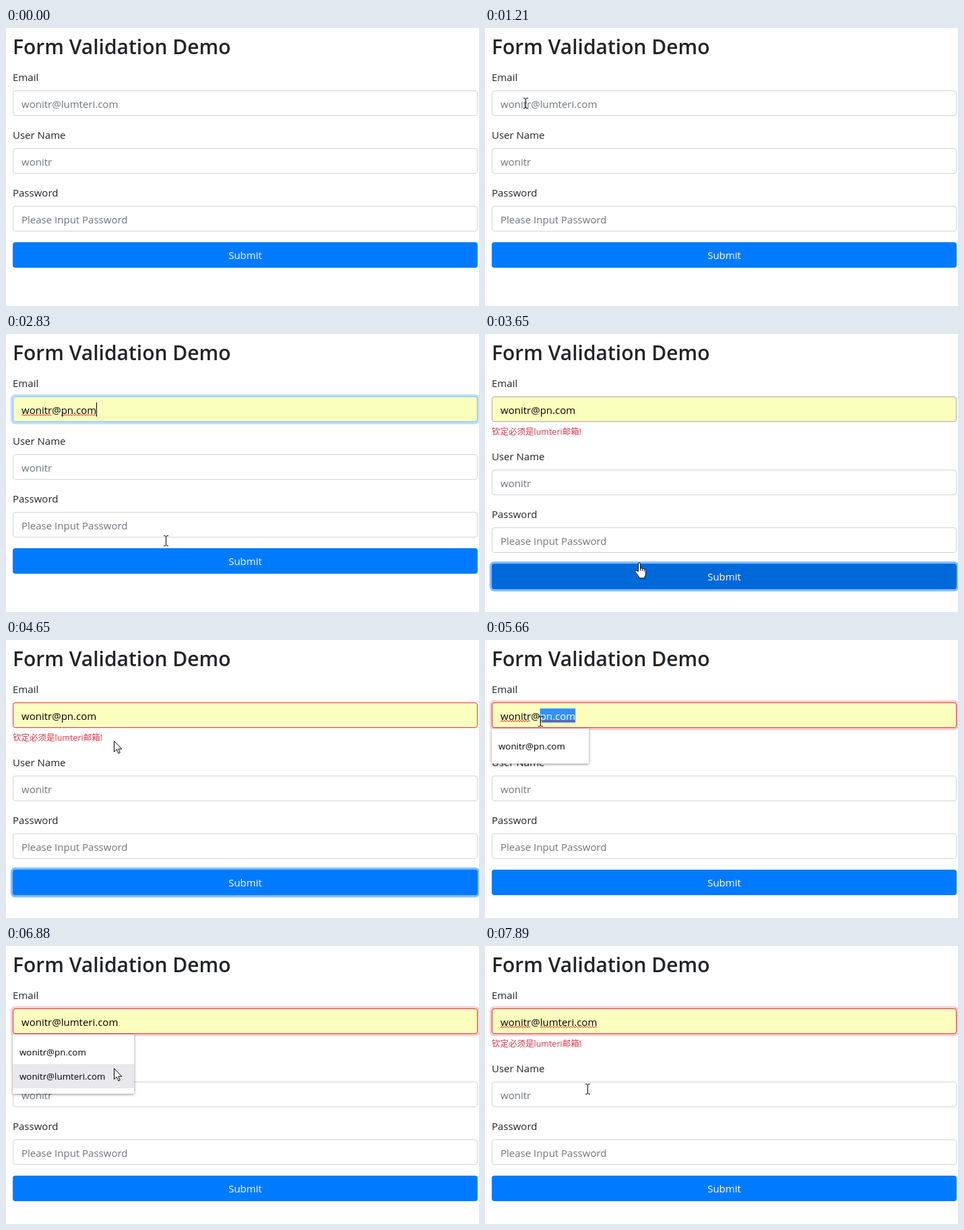
These frames come from a looping animation (702 by 414 pixels, 8000 ms). An HTML page:

```html
<!DOCTYPE html>
<html lang="en">
<head>
<meta charset="utf-8">
<title>Form Validation Demo</title>
<style>
  html, body { margin: 0; width: 100%; height: 100%; overflow: hidden; background: #fff; }
  svg { display: block; width: 702px; height: 414px; }
  text { font: 15px "Open Sans", "Noto Sans", sans-serif; fill: #212529; white-space: pre; }
  .title { font-size: 30px; font-weight: 600; }
  .hint { fill: #6c757d; }
  .item { font-size: 13.33px; fill: #000; }
  .error { font: 12.5px "Open Sans", "Noto Sans CJK SC", "Noto Sans CJK", sans-serif; fill: #dc3545; }
  .menu { filter: drop-shadow(0 1px 2px rgba(0, 0, 0, .45)); }
</style>
</head>
<body>
<svg id="stage" viewBox="0 0 702 414"></svg>
<script>
const LOOP = 8000;
const USER = 'wonitr';
const SHORT = USER + '@pn.com';
const LONG = USER + '@lumteri.com';
const stage = document.getElementById('stage');

const pen = document.createElement('canvas').getContext('2d');
const width = s => {
  pen.font = '15px "Open Sans", "Noto Sans", sans-serif';
  return pen.measureText(s).width;
};

const initial = {
  text: '', auto: false, border: '#ced4da', glow: '', menu: [], hot: -1,
  caret: false, wavy: false, select: false, error: false,
  button: '#007bff', ring: false, cursor: null
};

// Each step changes only the listed properties and then holds.
const steps = [
  [0, {}],
  [200, { cursor: ['arrow', 549, 397] }],
  [410, { cursor: ['arrow', 402, 306] }],
  [610, { cursor: ['beam', 214, 204] }],
  [810, { cursor: ['arrow', 96, 140] }],
  [1010, { cursor: ['beam', 42, 108] }],
  [1210, { cursor: ['beam', 60, 112] }],
  [1410, { cursor: ['beam', 70, 112], border: '#80bdff', glow: '#007bff', caret: true }],
  [1610, { text: 'w', menu: [SHORT, LONG, USER, 'wtest', 'w123'] }],
  [1810, { text: 'wo', menu: [SHORT, LONG, USER] }],
  [2020, { text: 'woni' }],
  [2220, { text: SHORT, auto: true, caret: false, hot: 0, cursor: ['arrow', 98, 154] }],
  [2420, { menu: [], hot: -1, wavy: true, caret: true, cursor: ['arrow', 104, 160] }],
  [2620, { caret: false, cursor: ['arrow', 184, 236] }],
  [2830, { caret: true, cursor: ['beam', 237, 308] }],
  [3030, { button: '#0069d9', cursor: ['hand', 231, 334] }],
  [3230, { caret: false, cursor: ['hand', 229, 340] }],
  [3650, { border: '#b5a3ab', glow: '', wavy: false, error: true, ring: true }],
  [3830, { border: '#dc3545' }],
  [4260, { button: '#007bff', cursor: ['beam', 206, 220] }],
  [4460, { cursor: ['arrow', 160, 150] }],
  [4660, { cursor: ['beam', 138, 114] }],
  [4860, { ring: false, glow: '#dc3545', wavy: true, caret: true, menu: [SHORT], cursor: ['beam', 134, 113] }],
  [5050, { caret: false, select: true, cursor: ['beam', 74, 112] }],
  [5660, { cursor: ['beam', 82, 121] }],
  [6260, { text: USER + '@', auto: false, select: false, wavy: false, caret: true, menu: [SHORT, LONG] }],
  [6880, { text: LONG, auto: true, caret: false, hot: 1, cursor: ['arrow', 160, 182] }],
  [7080, { cursor: ['arrow', 157, 188] }],
  [7280, { menu: [], hot: -1, wavy: true, caret: true, cursor: ['arrow', 155, 190] }],
  [7480, { cursor: ['beam', 153, 209] }],
  [7690, { caret: false, cursor: ['beam', 152, 216] }],
  [7890, { cursor: ['beam', 152, 213] }]
];
let last = initial;
const states = steps.map(([at, change]) => (last = { ...last, ...change, at }));

const rect = (x, y, w, h, fill, more = '') =>
  `<rect x="${x}" y="${y}" width="${w}" height="${h}" fill="${fill}" ${more}/>`;
const label = (x, y, s, more = '') => `<text x="${x}" y="${y}" ${more}>${s}</text>`;
const field = (y, fill = '#fff', border = '#ced4da') =>
  rect(10.5, y + .5, 689, 37, fill, `rx="3.5" stroke="${border}"`);
const halo = (y, color, alpha) =>
  rect(6.8, y - 3.2, 696.4, 44.4, color, `rx="7" opacity="${alpha}"`);

function wave(x, w) {
  let d = `M${x} 121.5`;
  for (let i = 2; i <= w; i += 2) d += `l2 ${i % 4 ? -1.6 : 1.6}`;
  return `<path d="${d}" fill="none" stroke="#e00000" stroke-width=".9"/>`;
}

function email(s) {
  let out = s.glow ? halo(93, s.glow, .25) : '';
  out += field(93, s.auto ? '#faffbd' : '#fff', s.border);
  if (!s.text) {
    if (s.glow === '' || s.caret) out += label(23, 119, LONG, 'class="hint"');
  } else {
    const head = s.text.slice(0, USER.length + 1), tail = s.text.slice(USER.length + 1);
    const split = 23 + width(head);
    if (s.select) out += rect(split, 102, width(tail), 21, '#3390ff');
    out += label(23, 119,
      `${head}<tspan ${s.select ? 'fill="#fff"' : ''}>${tail}</tspan>`,
      `style="fill:${s.auto ? '#000' : '#495057'}"`);
    if (s.wavy) out += wave(23, width(USER)) + wave(split, width(tail));
  }
  if (s.caret) out += rect(Math.round(23 + width(s.text)), 102, 1, 21, '#000');
  return out;
}

function menu({ menu: items, hot }) {
  if (!items.length) return '';
  const w = items.includes(LONG) ? 180 : 144;
  return rect(10, 132, w, 16 + 36 * items.length, '#fff', 'class="menu"') +
    (hot < 0 ? '' : rect(10, 140 + 36 * hot, w, 36, '#e8e8ed')) +
    items.map((s, i) => label(20, 163 + 36 * i, s, 'class="item"')).join('');
}

const cursors = {
  arrow: '<path d="M.5 .5V16.5L4.2 13L6.8 18.8L9.2 17.8L6.7 12.2H11.8Z" fill="#fff" stroke="#000"/>',
  beam: '<path d="M-3 -7.5H-1L.5 -6.5L2 -7.5H4M.5 -6.5V6.5M-3 7.5H-1L.5 6.5L2 7.5H4" fill="none" stroke="#000"/>',
  hand: '<path d="M-1.5 13.5V2.2a1.5 1.5 0 0 1 3.2 0V9.2q1.7-1.4 3 .3q1.7-1 2.8.6q2.2-.4 2.2 1.7V17' +
    'q0 2.5-1.7 4.2V23.5H-.5V21.5L-5.8 14.6q-1.2-2 .4-2.6q1.4-.4 2.6 1z" fill="#fff" stroke="#000"/>' +
    '<path d="M1.7 8.5V12.5M4.7 9.5V13M7.5 10.5V13.5" stroke="#000"/>'
};

function draw(s) {
  const dy = s.error ? 23 : 0;
  stage.innerHTML =
    label(10, 39, 'Form Validation Demo', 'class="title"') +
    label(10, 79, 'Email') + email(s) +
    (s.error ? label(10, 150, '钦定必须是lumteri邮箱!', 'class="error"') : '') +
    `<g transform="translate(0 ${dy})">` +
    label(10, 165, 'User Name') + field(179) + label(23, 205, USER, 'class="hint"') +
    label(10, 251, 'Password') + field(265) + label(23, 291, 'Please Input Password', 'class="hint"') +
    (s.ring ? halo(319, '#007bff', .5) : '') +
    rect(10, 319, 690, 38, s.button, 'rx="4"') +
    label(355, 344, 'Submit', 'text-anchor="middle" style="fill:#fff"') + '</g>' +
    menu(s) +
    (s.cursor ? `<g transform="translate(${s.cursor[1]} ${s.cursor[2]})">${cursors[s.cursor[0]]}</g>` : '');
}

const start = performance.now();
let shown = null;
function tick() {
  const t = (performance.now() - start) % LOOP;
  const state = states.filter(s => s.at <= t).pop();
  if (state !== shown) draw(shown = state);
  requestAnimationFrame(tick);
}
tick();
</script>
</body>
</html>
```
